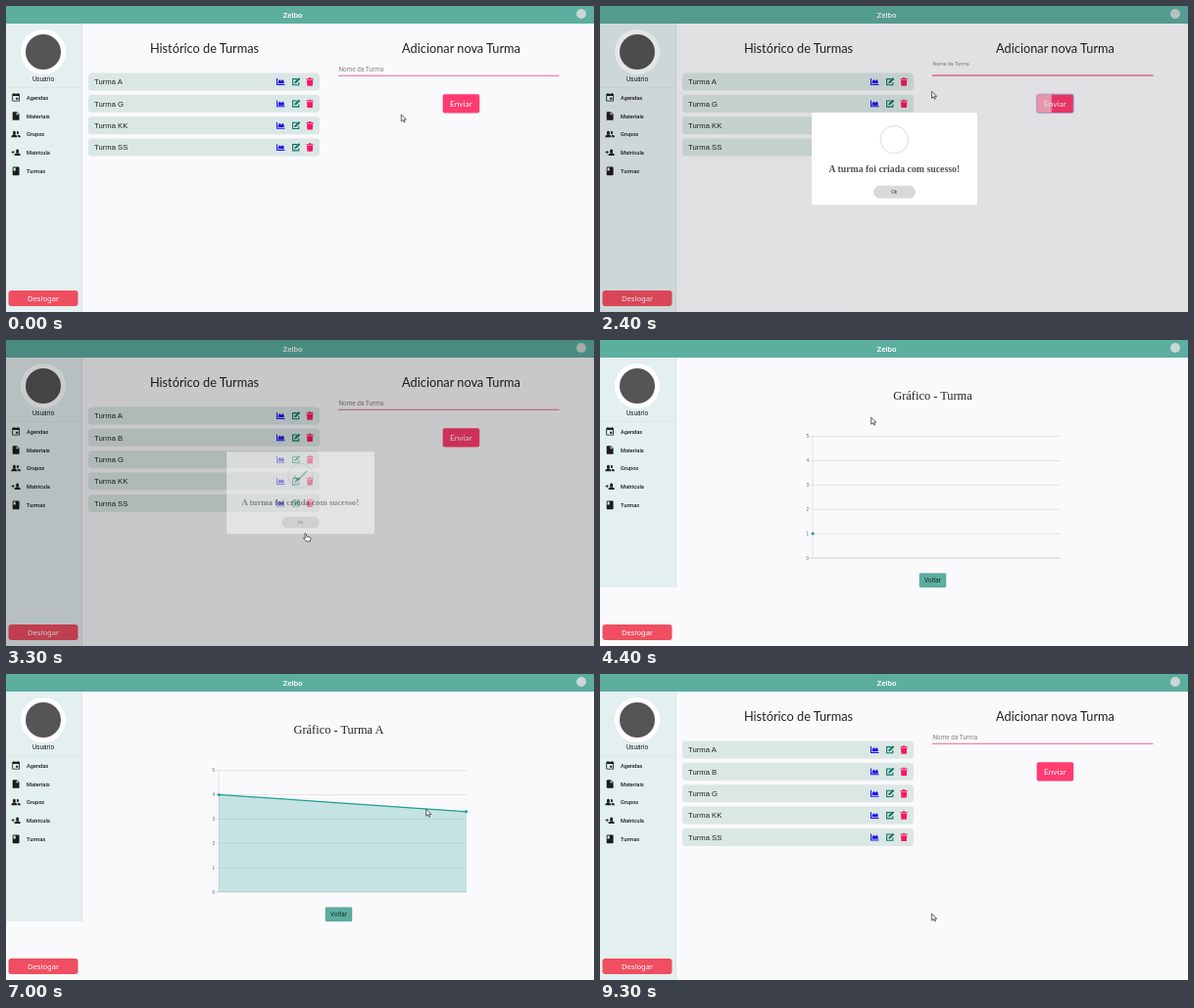
Animation, 600 px wide and 313 px high, one loop 9.7 s. Source, as an HTML page:

```html
<!DOCTYPE html>
<html lang="pt">
<head>
<meta charset="utf-8">
<title>Turmas</title>
<style>
  html, body { margin: 0; width: 100%; height: 100%; overflow: hidden; background: #faf9fb; }
  svg { display: block; width: 100vw; height: 100vh; }
  text { fill: #222; white-space: pre; }
  .lato { font-family: Lato, sans-serif; }
  .roboto { font-family: Roboto, sans-serif; }
  .medium { font-family: Roboto, sans-serif; font-weight: 500; }
  .noto { font-family: "Noto Sans", sans-serif; }
  .arial { font-family: "Liberation Sans", sans-serif; }
  .serif { font-family: "Liberation Serif", serif; }
  .bold { font-weight: 700; }
  .mid { text-anchor: middle; }
  .end { text-anchor: end; }
</style>
</head>
<body>
<svg id="stage" viewBox="0 0 600 313"></svg>
<script>
const LOOP = 9700, STEP = 100;
const TEAL = '#5cae9f', PINK = '#ff3b70', LINE = '#1d9f94';
const stage = document.getElementById('stage');

const ramp = (t, from, to) => Math.min(1, Math.max(0, (t - from) / (to - from)));
const mix = (a, b, k) => a + (b - a) * k;
const smooth = k => k * k * (3 - 2 * k);
const outQuart = k => 1 - (1 - k) ** 4;
const within = (t, from, to) => t >= from && t < to;

const text = (x, y, size, cls, str, fill = '#222') =>
  `<text x="${x}" y="${y}" font-size="${size}" class="${cls}" style="fill:${fill}">${str}</text>`;
const rect = (x, y, w, h, fill, r = 0, extra = '') =>
  `<rect x="${x}" y="${y}" width="${w}" height="${h}" rx="${r}" fill="${fill}" ${extra}/>`;
const circle = (x, y, r, fill, extra = '') =>
  `<circle cx="${x}" cy="${y}" r="${r}" fill="${fill}" ${extra}/>`;
const path = (d, fill, extra = '') => `<path d="${d}" fill="${fill}" ${extra}/>`;
const at = (x, y, body, scale = 1) =>
  `<g transform="translate(${x} ${y}) scale(${scale})">${body}</g>`;

// Menu icons on a 24 unit grid
const person = (x, y) => `M${x - 3} ${y}a3.4 3.4 0 1 0 6 0a3.4 3.4 0 1 0-6 0zM${x - 7} ${y + 10}v-2q0-4 7-4t7 4v2z`;
const MENU = [
  ['Agendas', 'M17 12h-5v5h5zM16 1v2H8V1H6v2H5q-2 0-2 2v14q0 2 2 2h14q2 0 2-2V5q0-2-2-2h-1V1zM19 19H5V8h14z'],
  ['Materiais', 'M6 2q-2 0-2 2v16q0 2 2 2h12q2 0 2-2V8l-6-6zM13 9V3.5L18.5 9z'],
  ['Grupos', person(8, 9) + 'M13.5 10.5a3.3 3.3 0 1 0 0-5q2 2.500 0 5zM16 13q7 .5 7 4v2h-6v-2q0-2.500-2-4z'],
  ['Matrícula', person(15.500, 9) + 'M6 10V7H4v3H1v2h3v3h2v-3h3v-2z'],
  ['Turmas', 'M18 2H6q-2 0-2 2v16q0 2 2 2h12q2 0 2-2V4q0-2-2-2zM6 4h5v8l-2.500-1.500L6 12z']
];
const chartIcon = path('M0 .3h1v5.900h7.500v1H0zM1.700 5.500V3.300L3.200 1.300 4.800 3 6.300 1.300 7.700 3.200v2.300z', '#1c10f0');
const editIcon =
  path('M5.300 1.300H.6v6.200h6.200V4.800', 'none', 'stroke="#0f7364" stroke-width="1.100"') +
  path('M2.300 5.900l.3-1.700L6.800 0l1.500 1.500-4.300 4.200z', '#0f7364');
const trashIcon = path('M0 .9h2.200L2.600 0h2l.4.900h2.200v1H0zM.5 2.500h6.200l-.4 5.900H.9z', '#fb1564');

function header() {
  return rect(0, 0, 600, 18, TEAL) +
    text(292.5, 11.5, 8, 'medium mid', 'Zelbo', '#fff') +
    circle(587, 8, 5, '#cbd6d5');
}

function sidebar(height) {
  const items = MENU.map(([label, icon], i) => {
    const y = 93.7 + i * 18.8;
    return at(5, y - 5.2, path(icon, '#1c1c1c', 'fill-rule="evenodd"'), .43) +
      text(21, y + 2, 5.65, 'medium', label, '#1c1c1c');
  }).join('');
  return rect(0, 18, 77.5, height, '#e4eff0') +
    rect(77.2, 18, .6, height, '#cfd9da') +
    circle(38, 47, 23, '#fff') + circle(38, 47, 18, '#555557') +
    text(38, 77, 6.5, 'roboto mid', 'Usuário') +
    rect(0, 83, 77.5, .5, '#d3dedf') + items +
    rect(2.5, 291, 71, 16, '#f04e61', 3) +
    text(38, 301.7, 7.6, 'noto mid', 'Deslogar', '#fff');
}

function listPage(t) {
  const names = t >= 2500 ? ['A', 'B', 'G', 'KK', 'SS'] : ['A', 'G', 'KK', 'SS'];
  const rows = names.map((name, i) => {
    const y = 68.5 + i * 22.35;
    return rect(84, y, 236, 18, '#dae7e5', 3.5) +
      text(90, y + 11.8, 7.7, 'arial', 'Turma ' + name) +
      at(276, y + 5.3, chartIcon) + at(292, y + 4.8, editIcon) + at(306.5, y + 4.8, trashIcon);
  }).join('');
  return sidebar(295) + rows +
    text(202.5, 48.2, 12.75, 'lato mid', 'Histórico de Turmas') +
    text(464.5, 48.2, 12.75, 'lato mid', 'Adicionar nova Turma') +
    field(t) + sendButton(t);
}

function field(t) {
  const lift = smooth(ramp(t, 800, 1000)) - smooth(ramp(t, 2400, 2600));
  const typed = t >= 2300 ? '' : t >= 1300 ? 'Turma B' : 'Turma'.slice(0, 5 * ramp(t, 800, 1100));
  return text(339.5, mix(67.4, 60.6, lift), mix(6.4, 5.2, lift), 'roboto', 'Nome da Turma', '#858587') +
    text(339.5, 68.6, 6.5, 'roboto', typed) +
    rect(339, mix(70.8, 70.5, lift), 225.5, mix(.8, 1.1, lift), lift > .5 ? '#ee3f74' : '#d9497c');
}

function sendButton(t) {
  const sweep = smooth(ramp(t, 1800, 2100)) * (1 - ramp(t, 2200, 2533));
  const focused = within(t, 2000, 2500);
  return rect(445.7, 90.2, 37.5, 19.3, PINK, 2, focused ? 'stroke="#b4aee6" stroke-width="1"' : '') +
    rect(446.2, 90.7, 36.5 * sweep, 18.3, 'rgba(255,255,255,.55)') +
    text(464.4, 102.8, 8.3, 'lato mid', 'Enviar', '#fff');
}

const valueY = v => 223 - v * 24.9;

function chartPage(t) {
  const loaded = t >= 4500;
  const grid = [0, 1, 2, 3, 4, 5].map(v =>
    rect(213.5, valueY(v) - .4, 256.5, .8, v ? '#e2e1e3' : '#c3c5c8') +
    text(213, valueY(v) + 1.6, 4.6, 'arial end', v, '#666')).join('');
  const first = valueY(4 * outQuart(ramp(t, 4330, 5330)));
  const last = valueY(3.3 * outQuart(ramp(t, 4430, 5400)));
  const area = !loaded ? '' :
    path(`M217 ${first}L470 ${last}V223H217z`, 'rgba(35,160,150,.25)') +
    path(`M217 ${first}L470 ${last}`, 'none', `stroke="${LINE}" stroke-width="1.3"`) +
    circle(469.6, last, 1.5, LINE);
  return sidebar(235) +
    text(339.5, 61.2, 12.4, 'serif mid', 'Gráfico - Turma' + (loaded ? ' A' : '')) +
    grid + rect(216.7, 98, .7, 130 - 5, '#d9d9db') + area + circle(217.2, first, 1.5, LINE) +
    rect(326, 238.700, 27, 14.3, TEAL, 1, 'stroke="#4c9688" stroke-width=".4"') +
    text(339.5, 248.2, 6.4, 'roboto mid', 'Voltar', '#17322e') +
    tooltip(220, 123.4, '2019-11-20', '4', 220, ramp(t, 6200, 6400) - ramp(t, 6500, 6800)) +
    tooltip(436, 141, '2019-11-27', '3.3', 467, ramp(t, 7000, 7200) - ramp(t, 8100, 8600));
}

function tooltip(x, y, date, value, caretX, alpha) {
  if (alpha <= 0) return '';
  const tip = caretX > x ? 2.5 : -2.5;
  return `<g opacity="${alpha}">` +
    rect(x, y - 8, 31, 16, 'rgba(0,0,0,.75)', 1.5) +
    path(`M${caretX} ${y - 2}l${tip} 2l${-tip} 2z`, 'rgba(0,0,0,.75)') +
    text(x + 2.3, y - 2.3, 4.6, 'arial bold', date, '#fff') +
    rect(x + 2.5, y + 1, 4.5, 4.5, '#148f86', 0, 'stroke="#31b3a8" stroke-width=".5"') +
    text(x + 8.5, y + 5, 4.6, 'arial', 'Média: ' + value, '#fff') + '</g>';
}

function dialog(t) {
  if (!within(t, 2400, 3400)) return '';
  const closing = t >= 3300;
  const scale = closing ? .75 : [.84, 1.04, .97][(t - 2400) / STEP] ?? 1;
  const shade = closing ? .2 : t < 2500 ? .1 : .4;
  const drawn = ramp(t, 2600, 2900);
  const tick = drawn && path('M291.500 133.200l5.600 5.600 13-12.800', 'none',
    `stroke="#84b5ad" stroke-width="2.400" pathLength="1" stroke-dasharray="${drawn} 2"`);
  return rect(0, 0, 600, 313, `rgba(0,0,0,${shade})`) +
    `<g opacity="${closing ? .5 : 1}" transform="translate(300.5 156.2) scale(${scale}) translate(-300.5 -156.2)">` +
    rect(200, 100.2, 201, 112, '#fff', 1.5) +
    circle(300.3, 133, 16.7, 'none', 'stroke="#dbe9e8" stroke-width="1.6"') + (tick || '') +
    text(300.3, 173, 11.7, 'serif bold mid', 'A turma foi criada com sucesso!', '#545456') +
    rect(275, 189, 51, 15.4, '#d9d9da', 7.7) +
    text(300, 198.600, 5.5, 'arial mid', 'Ok', '#333') + '</g>';
}

// Pointer stops: time, x, y
const STOPS = [
  [200, 403.3, 111], [800, 365, 65], [1400, 365, 65], [1900, 462, 100], [2200, 462, 100],
  [2400, 338.5, 87.3], [2900, 305.5, 197.5], [3400, 305.5, 197.5], [4000, 279, 77],
  [4200, 279, 77], [4400, 276.7, 79.2], [4700, 276.7, 79.2], [5800, 216.8, 123.6],
  [6400, 216.8, 123.6], [7200, 468, 141], [8000, 468, 141], [8200, 451.7, 149.5],
  [8600, 338.6, 245.2], [9700, 338.6, 245.2]
];
const OUTLINE = 'stroke="#222" stroke-width=".7" stroke-linejoin="round"';
const POINTERS = {
  arrow: path('M0 0v7l1.700-1.500 1.100 2.400 1.200-.5-1.100-2.400h2.200z', '#fff', OUTLINE),
  hand: path('M-.7.700q.7-1.300 1.400 0l.6 2.900 3.200.7q1.200.4.900 1.900l-.6 2.300H1L-2 5.200q0-1.200 1.900 0z', '#fff', OUTLINE),
  beam: path('M-1.500-3.500h3M0-3.500v7M-1.500 3.500h3', 'none', OUTLINE)
};

function pointer(t) {
  const next = Math.max(1, STOPS.findIndex(stop => t <= stop[0]));
  const [t0, x0, y0] = STOPS[next - 1], [t1, x1, y1] = STOPS[next];
  const k = smooth(ramp(t, t0, t1));
  const onButton = [[1900, 2300], [2900, 3400], [4000, 4300], [8600, 8900]].some(([a, b]) => within(t, a, b));
  const kind = onButton ? 'hand' : within(t, 700, 1600) ? 'beam' : 'arrow';
  return at(mix(x0, x1, k), mix(y0, y1, k), POINTERS[kind]);
}

function draw(now) {
  const t = Math.floor(now % LOOP / STEP) * STEP;
  const page = within(t, 4300, 8900) ? chartPage : listPage;
  stage.innerHTML = rect(0, 0, 600, 313, '#faf9fb') + page(t) + header() + dialog(t) + pointer(t);
}

const start = performance.now();
function tick() {
  draw(performance.now() - start);
  requestAnimationFrame(tick);
}
tick();
</script>
</body>
</html>
```
